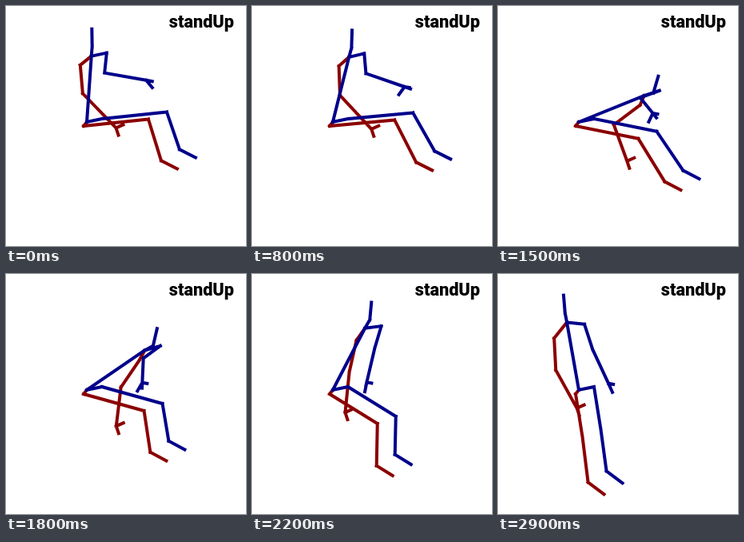
Write an HTML page that moves like this. It is 300 px wide and 300 px high and loops after 3000 ms.

```html
<!DOCTYPE html>
<html lang="en">
<head>
<meta charset="utf-8">
<title>standUp</title>
<style>
  html, body { margin: 0; width: 100%; height: 100%; overflow: hidden; background: #fff; }
  svg { display: block; width: 100vw; height: 100vh; }
  path { fill: none; stroke-width: 4; stroke-linecap: square; }
  #left { stroke: #8b0000; }
  #right { stroke: #00008b; }
  text { font: 900 21.7px Impact, Roboto, sans-serif; text-anchor: end; }
</style>
</head>
<body>
<svg viewBox="0 0 300 300">
  <path id="left"/>
  <path id="right"/>
  <text x="285" y="26.5">standUp</text>
</svg>
<script>
const LOOP = 3000, STEP = 100;
const ROOT = [101, 145], HIP_L = [97, 150], HIP_R = [120, 141];

// Key poses: trunk angle from upright, limb angles from straight down
// (forward is positive), and how far the ankle is ahead of the knee.
const times = [0, 800, 1300, 1500, 2000, 2500, 2900];
const keys = {
  lean:   [4, 14, 56, 68, 42, 6, -10],
  thigh:  [99, 98, 81, 73, 61, 23, 6],
  shin:   [16, 27, 38, 33, -3, 4, 7],
  upperR: [-6, 5, -61, -70, -36, 10, 18],
  upperL: [5, 2, -43, -53, -19, -7, 3],
  foreR:  [80, 71, 45, 39, -21, 8, 25],
  foreL:  [44, 43, 35, 20, -16, 19, 29],
  handR:  [40, -36, -22, -25, -32, 27, 24]
};

const sin = deg => Math.sin(deg * Math.PI / 180);
const cos = deg => Math.cos(deg * Math.PI / 180);
const add = (p, x, y) => [p[0] + x, p[1] + y];
const hang = (p, deg, len) => add(p, len * sin(deg), len * cos(deg));
const rise = (p, deg, len) => add(p, len * sin(deg), -len * cos(deg));

// Speed at key i; zero at the ends and at turning points
function slope(v, i) {
  if (i === 0 || i === v.length - 1) return 0;
  const h1 = times[i] - times[i - 1], h2 = times[i + 1] - times[i];
  const d1 = (v[i] - v[i - 1]) / h1, d2 = (v[i + 1] - v[i]) / h2;
  return d1 * d2 <= 0 ? 0 : (d1 * h2 + d2 * h1) / (h1 + h2);
}

// Cubic Hermite curve through the keys
function curve(v, t) {
  let i = 0;
  while (i < times.length - 2 && t >= times[i + 1]) i++;
  const h = times[i + 1] - times[i], u = (t - times[i]) / h;
  return v[i] + (v[i + 1] - v[i]) * u * u * (3 - 2 * u)
    + h * u * (1 - u) * ((1 - u) * slope(v, i) - u * slope(v, i + 1));
}

// Every bone is its own subpath, so each end gets a cap
const bones = (...points) => points.slice(1).map((p, i) => `M${points[i]}L${p}`).join("");

function leg(hip, thigh, shin, drop, stand) {
  const knee = add(hip, 82 * sin(thigh), 54 * cos(thigh));
  const ankle = add(knee, shin, drop + 0.1 * shin + 6 * stand);
  return bones(ROOT, hip, knee, ankle, add(ankle, 20, 10 + 5 * stand));
}

function render(t) {
  const k = {};
  for (const name in keys) k[name] = curve(keys[name], t);
  const bend = sin(k.lean), stand = cos(k.thigh) ** 2;

  const neck = rise(ROOT, k.lean, 82 + 6 * bend + 5 * stand);
  const skull = rise(neck, 1.1 * k.lean, 12);
  const crown = rise(skull, 0.27 * k.lean - 2, 22);

  const shoulderL = add(neck, -14.5 + 0.14 * k.lean, 11 + 9 * stand);
  const elbowL = hang(shoulderL, k.upperL, 35 + 6 * bend + 6 * stand);
  const wristL = hang(elbowL, k.foreL, 61 - 13 * bend - 9 * stand);

  const shoulderR = add(neck, 19 + 3 * stand, -4 - 3 * bend + 6 * stand);
  const elbowR = hang(shoulderR, k.upperR, 25 + 8 * stand);
  const wristR = hang(elbowR, k.foreR, 53 - 32 * bend ** 2 - 5 * stand);
  const palmR = hang(wristR, k.foreR, 8 * (1 - stand));

  draw("left", leg(HIP_L, k.thigh, k.shin, 50, stand)
    + bones(neck, shoulderL, elbowL, wristL, add(wristL, 3, 9))
    + bones(wristL, add(wristL, 9, -4)));
  draw("right", leg(HIP_R, k.thigh, k.shin, 45, stand)
    + bones(ROOT, neck, skull, crown)
    + bones(neck, shoulderR, elbowR, wristR, palmR)
    + bones(hang(wristR, k.handR, 12), wristR, add(wristR, 6, 1)));
}

const draw = (id, d) => document.getElementById(id).setAttribute("d", d);

const start = performance.now();
function tick() {
  const t = (performance.now() - start) % LOOP;
  render(Math.floor(t / STEP) * STEP);
  requestAnimationFrame(tick);
}
tick();
</script>
</body>
</html>
```
